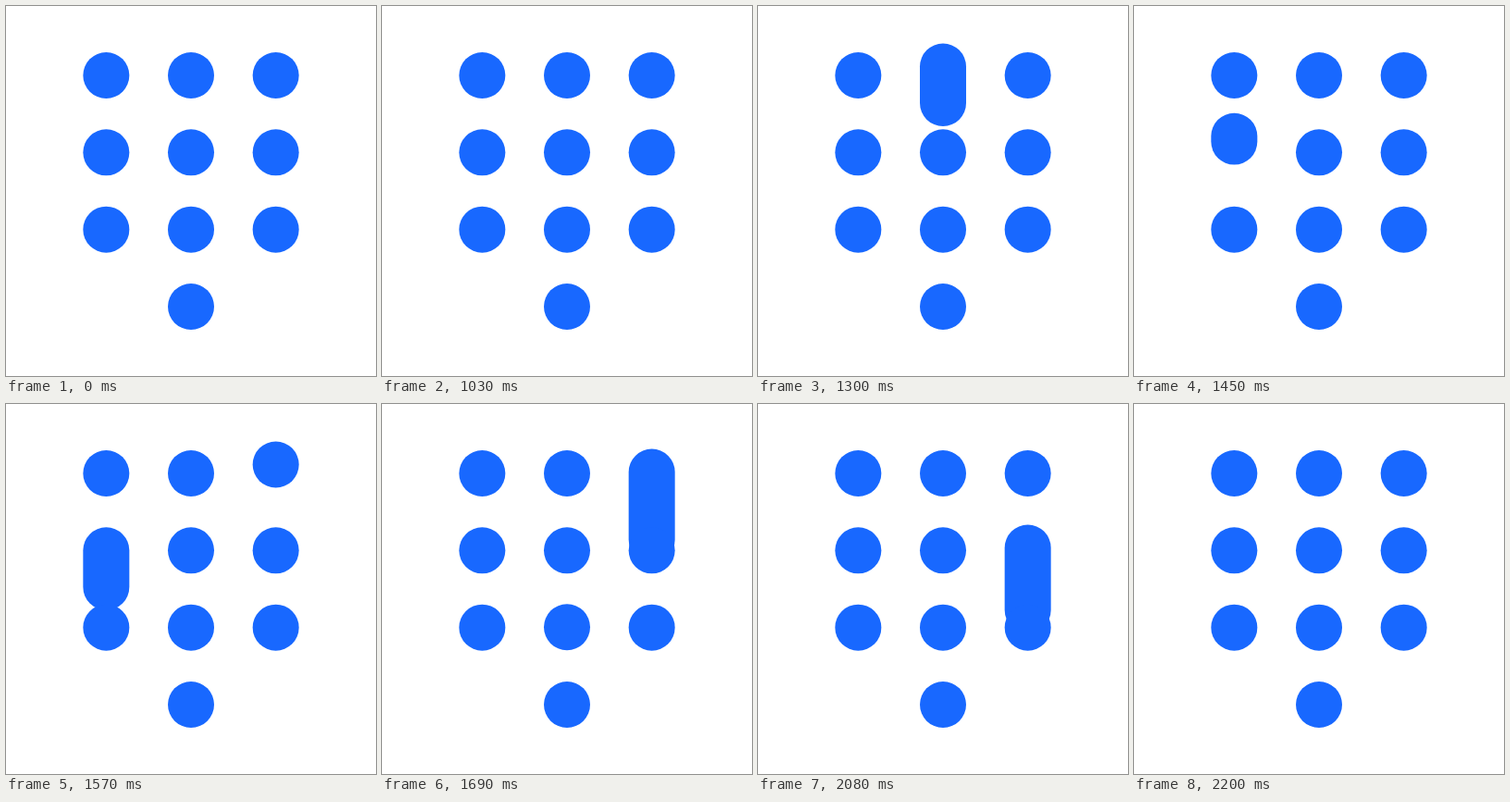
Animation, 400 px wide and 400 px high, one loop 2.23 s. Source, as an HTML page:

```html
<!DOCTYPE html>
<html lang="en">
<head>
<meta charset="utf-8">
<title>Dial pad</title>
<style>
  html, body { margin: 0; height: 100%; overflow: hidden; background: #fff; }
  svg { display: block; width: 100vw; height: 100vh; }
  path { stroke: #1868ff; stroke-width: 50; stroke-linecap: round; }
</style>
</head>
<body>
<svg id="pad" viewBox="0 0 400 400"></svg>
<script>
const LOOP = 2230, STEP = 30, PHASE = 90;
const LIFT = -19, DROP = 79;

// Start time in ms of each key press, by key
const presses = { 1: 1030, 2: 1165, 4: 1345, 3: 1525, 8: 1682, 6: 1922 };

const pad = document.getElementById('pad');
const keys = [1, 2, 3, 4, 5, 6, 7, 8, 9, 0].map((digit, i) => {
  const path = document.createElementNS('http://www.w3.org/2000/svg', 'path');
  pad.append(path);
  return {
    path,
    x: 200 + (digit ? i % 3 - 1 : 0) * 275 / 3,
    y: 75 + Math.floor(i / 3) * 250 / 3,
    start: presses[digit] ?? Infinity
  };
});

function ease(time) {
  const p = Math.min(1, Math.max(0, time / PHASE));
  return p * p * (3 - 2 * p);
}

// Lift the dot, stretch it down to the next row, then pull it back
function stretch(time) {
  const lift = ease(time);
  const fall = ease(time - PHASE);
  const back = ease(time - 2 * PHASE);
  const top = LIFT * (lift - fall);
  return [top, top + DROP * (fall - back)];
}

function draw(now) {
  const t = Math.floor((now % LOOP - 10) / STEP) * STEP + 10;
  for (const { path, x, y, start } of keys) {
    const [top, bottom] = stretch(t - start);
    path.setAttribute('d', `M${x} ${y + top}V${y + bottom + 0.01}`);
  }
  requestAnimationFrame(draw);
}
draw(0);
</script>
</body>
</html>
```
